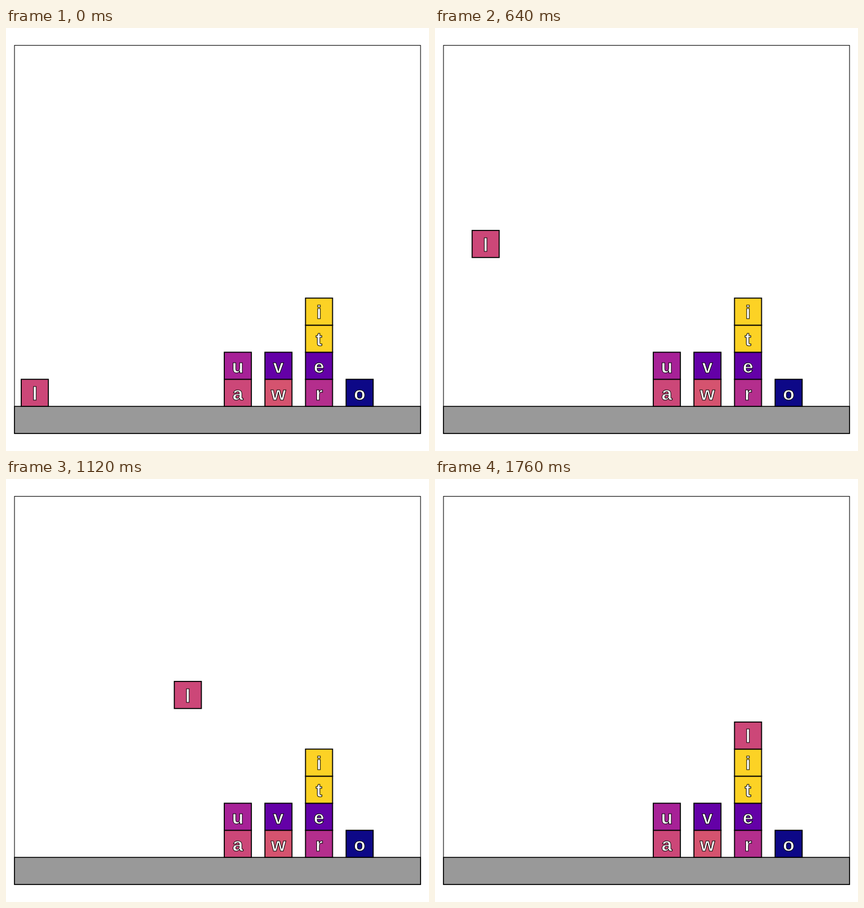
Write an HTML page that moves like this. It is 748x748 px and loops after 1.8 s.

```html
<!DOCTYPE html>
<html lang="en">
<head>
<meta charset="utf-8">
<title>Stacking blocks</title>
<style>
  html, body { margin: 0; width: 100%; height: 100%; overflow: hidden; background: #fff; }
  svg { display: block; width: 100vw; height: 100vh; }
  text {
    font: bold 34px "Liberation Sans", Arial, sans-serif;
    text-anchor: middle;
    fill: #fff;
    stroke: #000;
    stroke-width: 1;
  }
</style>
</head>
<body>
<svg id="stage" viewBox="0 0 748 748"></svg>
<script>
const UNIT = 47.87;
const LEFT = 15;
const GROUND = 669.1;
const STEP = 40;
const LOOP = 1800;

const stage = document.getElementById('stage');

function add(parent, tag, attrs, text) {
  const node = document.createElementNS('http://www.w3.org/2000/svg', tag);
  for (const key in attrs) node.setAttribute(key, attrs[key]);
  if (text) node.textContent = text;
  parent.appendChild(node);
  return node;
}

const columnX = column => LEFT + (0.25 + 1.5 * column) * UNIT;
const levelY = level => GROUND - (level + 1) * UNIT;

function place(block, column, level) {
  block.setAttribute('transform', `translate(${columnX(column)} ${levelY(level)})`);
}

function addBlock(letter, color, column, level) {
  const block = add(stage, 'g', {});
  add(block, 'rect', { width: UNIT, height: UNIT, fill: color, stroke: '#000', 'stroke-width': 1.8 });
  add(block, 'text', { x: UNIT / 2, y: 36.6 }, letter);
  place(block, column, level);
  return block;
}

add(stage, 'rect', { x: LEFT, y: 30.7, width: 15 * UNIT, height: 686.3, fill: '#fff', stroke: '#000', 'stroke-width': 1.1 });
add(stage, 'rect', { x: LEFT, y: GROUND, width: 15 * UNIT, height: UNIT, fill: '#999', stroke: '#000', 'stroke-width': 1.6 });

addBlock('a', '#cc4778', 5, 0);
addBlock('u', '#a72197', 5, 1);
addBlock('w', '#d5536f', 6, 0);
addBlock('v', '#6400a7', 6, 1);
addBlock('r', '#b42e8d', 7, 0);
addBlock('e', '#6400a7', 7, 1);
addBlock('t', '#fcd225', 7, 2);
addBlock('i', '#fcd225', 7, 3);
addBlock('o', '#0d0887', 8, 0);
const mover = addBlock('l', '#cc4778', 0, 0);

const progress = (step, start, count) => Math.min(1, Math.max(0, (step - start) / count));

// Lift for 14 steps, carry across for 26, lower for 4.
function render(time) {
  const step = Math.floor((time % LOOP) / STEP);
  const column = 7 * progress(step, 14, 26);
  const level = 5.5 * progress(step, 0, 14) - 1.5 * progress(step, 40, 4);
  place(mover, column, level);
}

const start = performance.now();
function tick() {
  render(performance.now() - start);
  requestAnimationFrame(tick);
}
tick();
</script>
</body>
</html>
```
